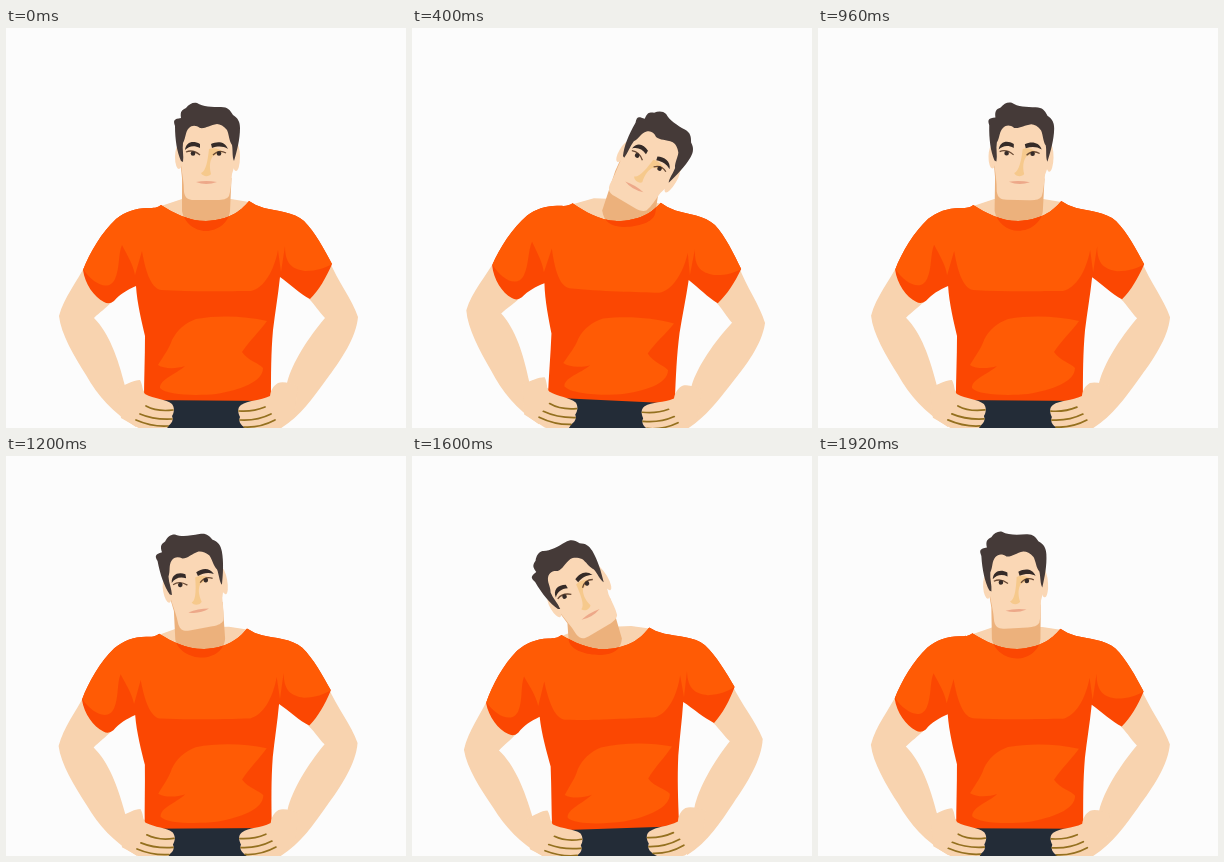
An HTML page that plays this animation: 400x400 px, repeating every 2 s.

```html
<!DOCTYPE html>
<html lang="en">
<head>
<meta charset="utf-8">
<title>Neck stretch</title>
<style>
  html, body { margin: 0; height: 100%; overflow: hidden; background: #fcfcfc; }
  svg { display: block; width: 100%; height: 100%; }
  .skin { fill: #f8d3af; }
  .face { fill: #fad7b5; }
  .dark { fill: #fb4702; }
  .light { fill: #ff5b05; }
  .hair { fill: #453a38; }
  .brow { fill: #352b28; }
  .line { fill: none; stroke: #94701f; stroke-width: 1.7; stroke-linecap: round; }
</style>
</head>
<body>
<svg viewBox="0 0 400 400">
  <defs>
    <path id="shirt" d="M155 177C151 180 148 180 142 180C129 180 119 184 110 191C96 204 84 224 77 242C79 256 88 269 98 274Q103 277 108 273C114 266 121 262 130 258C131 275 136 295 139 308C139 330 138 350 138 372L265 373C265 345 265 325 267 302C269 285 272 268 274 249C284 256 294 266 304 271C313 262 320 250 326 236C318 221 309 204 298 193C288 184 270 183 258 180Q250 178 243 173C234 184 222 192 200 193C182 193 168 185 155 177Z"/>
    <path id="neck"/>
    <clipPath id="inShirt"><use href="#shirt"/></clipPath>
  </defs>
  <g id="body">
    <path fill="#232c37" d="M139 371H264V425H139Z"/>
    <path class="skin" d="M155 178L176 171H225L243 174L230 200H172Z"/>
    <use href="#neck" fill="#ecb17c"/>

    <!-- arms -->
    <path class="skin" d="M80 236C71 254 58 269 53 288C55 306 68 328 80 347C92 368 106 384 130 399L150 366L119 358C112 330 103 305 88 290C94 284 99 281 108 272L104 240Z"/>
    <path class="skin" d="M323 232C332 254 346 271 352 289C350 310 335 332 320 352C306 371 294 389 272 402L255 368L281 355C286 335 302 310 319 290C313 284 308 275 300 268L300 240Z"/>

    <!-- shirt -->
    <use href="#shirt" class="dark"/>
    <g clip-path="url(#inShirt)">
      <path class="light" d="M155 170L100 175L70 238L77 241C87 256 103 264 109 251C114 240 112 226 116 217C121 227 127 236 129 247L136 223C139 240 144 260 155 262C185 264 225 263 245 263C258 260 268 243 272 222L275 244L279 218C279 236 286 241 299 243C311 243 319 240 326 236L335 230L300 175L243 168Z"/>
      <path class="light" d="M152 337C158 327 163 321 166 312C171 302 179 295 190 291C213 287 239 288 261 293C254 303 243 313 236 324C242 333 253 335 257 340C257 354 234 362 210 366C188 368 160 367 154 360C154 351 169 347 179 338C170 341 158 341 152 337Z"/>
      <use href="#neck" class="dark"/>
    </g>

    <!-- hands -->
    <path class="skin" d="M112 360C121 356 128 352 134 352C137 357 136 363 139 366C148 371 160 371 166 376C169 380 168 385 166 388C168 393 165 396 162 398C160 407 146 406 136 402L115 390Z"/>
    <path class="skin" d="M292 358C285 356 278 353 272 355C267 358 265 362 264 368C254 373 242 372 235 377C231 380 232 385 234 389C232 394 235 397 238 399C246 407 262 404 270 402L288 388Z"/>
    <path class="line" d="M140 378Q151 384 167 382M134 386Q148 392 166 391M130 392Q146 399 162 398M233 383Q247 384 259 379M234 392Q251 393 265 386M238 399Q254 400 269 392"/>

    <g id="head">
      <ellipse class="face" cx="173" cy="129" rx="4" ry="12"/>
      <ellipse class="face" cx="230" cy="129" rx="4" ry="14"/>
      <path class="face" d="M174 92H228L232 108C233 122 230 134 226 146C225 155 225 162 223 168C221 171 217 172 211 172H188C182 172 179 170 178 164C178 154 176 146 175 136Z"/>
      <path class="hair" d="M175 133C171 124 169 112 169 98C167 92 168 91 175 90C174 83 176 82 180 80C183 76 187 74 191 75C197 79 206 79 215 79C222 79 224 82 227 87C232 90 234 94 234 100C234 111 231 123 228 133C226 129 227 122 226 117C223 113 223 106 221 102C218 98 214 96 211 96C204 97 199 101 194 100C190 97 186 97 183 100C179 104 180 110 177 115C176 121 178 128 177 134Z"/>
      <path fill="#f6c98c" d="M203 121C208 119 214 121 217 124L207 128C204 132 203 138 205 146C203 149 197 149 195 145C200 144 202 131 203 121Z"/>
      <path class="brow" d="M179 122C180 114 187 112 194 116L194 120C188 117 183 118 179 122ZM205 116C211 113 219 113 222 121C217 118 212 118 206 120Z"/>
      <path fill="none" stroke="#6b4b35" stroke-width="1.3" d="M180 124Q187 121 194 127M207 127Q213 121 220 125"/>
      <circle class="brow" cx="187" cy="125.5" r="2.3"/>
      <circle class="brow" cx="213" cy="125.5" r="2.3"/>
      <path fill="#eda889" d="M190 154Q200 152 211 154Q200 158 190 154Z"/>
    </g>
  </g>
</svg>
<script>
const el = id => document.getElementById(id);
const STEP = 80, LOOP = 2000, HEAD = 32, BODY = 2.6;
const PIVOT = [200, 187];

const ease = (s, soft) => s * s * (3 * (1 - s) * soft + s);

// lean from -1 to 1: out to one side, back, then the other side
function lean(t) {
  const side = t < LOOP / 2 ? 1 : -1;
  const p = t % (LOOP / 2) / (LOOP / 4);
  return side * (p < 1 ? ease(p ** 1.1, 1) : 1 - ease((p - 1) ** 0.9, 0.88));
}

function turn(x, y, deg) {
  const a = deg * Math.PI / 180, c = Math.cos(a), s = Math.sin(a);
  const dx = x - PIVOT[0], dy = y - PIVOT[1];
  return [PIVOT[0] + dx * c - dy * s, PIVOT[1] + dx * s + dy * c];
}

// the top of the neck follows the jaw, its base slides and widens a little
function neckPath(k) {
  const jaw = (x, y) => turn(x, y, k * HEAD);
  const bend = Math.abs(k), low = 203 - 5 * bend, mid = 200 + 7 * k;
  const left = 176 + 13 * k - 3 * bend, right = 224 + 13 * k + 3 * bend;
  return `M${jaw(174.5, 136)}L${jaw(176, 150)}L${left} 183` +
    `C${left + 2} 194 ${mid - 12} ${low} ${mid} ${low}` +
    `S${right - 1} 194 ${right} 183L${jaw(225.5, 150)}Z`;
}

function draw() {
  const t = Math.floor(performance.now() % LOOP / STEP) * STEP;
  const k = lean(t);
  el('body').setAttribute('transform', `rotate(${k * BODY} 200 318)`);
  el('head').setAttribute('transform', `rotate(${k * HEAD} ${PIVOT})`);
  el('neck').setAttribute('d', neckPath(k));
  requestAnimationFrame(draw);
}
draw();
</script>
</body>
</html>
```
